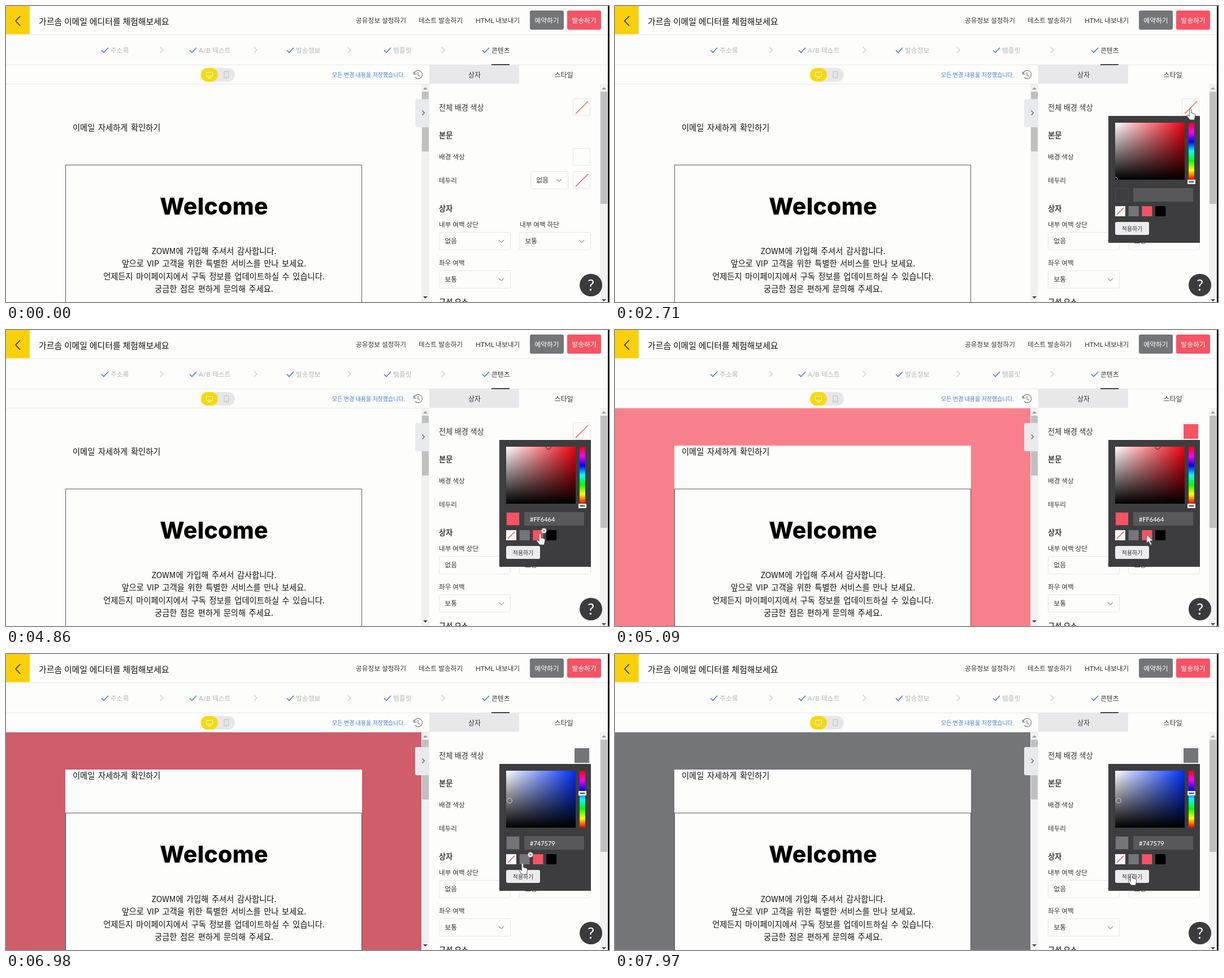
An HTML page that plays this animation: 1067 px wide and 525 px high, repeating every 8000 ms.

```html
<!DOCTYPE html>
<html lang="ko">
<head>
<meta charset="utf-8">
<style>
html, body { margin: 0; width: 100%; height: 100%; overflow: hidden; background: #fdfdfc; }
svg { position: fixed; left: 0; top: 0; display: block; }
text { font-family: Lato, "Noto Sans CJK KR", "Noto Sans CJK", sans-serif; white-space: pre; }
text.mail { font-family: "Noto Sans CJK KR", "Noto Sans CJK", sans-serif; word-spacing: 1.6px; }
text.logo { font-family: Inter, sans-serif; font-weight: 800; letter-spacing: .2px; }
text.head { stroke: #222; stroke-width: .3px; }
</style>
</head>
<body>
<svg id="stage" width="1067" height="525" viewBox="0 0 1067 525"></svg>
<script>
const RED = [246, 83, 100], GREY = [116, 117, 121], WHITE = [253, 253, 252];
const rgb = c => `rgb(${c.map(Math.round)})`;
const red = rgb(RED), grey = rgb(GREY), paper = rgb(WHITE);

const rect = (x, y, w, h, fill, more = '') =>
  `<rect x="${x}" y="${y}" width="${w}" height="${h}" fill="${fill}" ${more}/>`;
const line = (d, color, width = 1, more = '') =>
  `<path d="${d}" fill="none" stroke="${color}" stroke-width="${width}" ${more}/>`;
// y is the vertical middle of the glyphs
const text = (x, y, size, str, color = '#333', more = '') =>
  `<text x="${x}" y="${y + size * .37}" font-size="${size}" fill="${color}" ${more}>${str}</text>`;
const mid = 'text-anchor="middle"';
const head = (y, str) => text(766, y, 13.2, str, '#222', 'class="head"');
const frame = (x, y, w, h) => rect(x + .5, y + .5, w, h, paper, 'rx="2" stroke="#e6e6ec"');
const slash = (x, y, w, color) => line(`M${x} ${y + w}l${w} ${-w}`, color, 1.4);
const select = (x, y, w, str) => frame(x, y, w, 31) + text(x + 10.5, y + 16, 11.7, str) +
  line(`M${x + w - 20} ${y + 14}l4.5 4.5 4.5-4.5`, '#555');
const check = x => line(`M${x} 78.5l4 4 8-8.5`, '#4a7de8', 1.7);
const arrow = (x, y, dir, color) => `<path d="M${x - 4} ${y + 2 * dir}h8l-4 ${-4 * dir}z" fill="${color}"/>`;
const stops = list => list.map((c, i) =>
  `<stop offset="${i / (list.length - 1)}" stop-color="${c}"/>`).join('');

const editor = rect(0, 138, 735, 387, paper, 'id="backdrop"') +
  rect(105, 205, 525, 320, paper) +
  rect(105.5, 282, 524, 260, 'none', 'stroke="#55555c"') +
  text(118, 216, 14.25, '이메일 자세하게 확인하기', '#111', 'class="mail"') +
  text(368, 355, 41, 'Welcome', '#000', `class="logo" ${mid}`) +
  ['ZOWM에 가입해 주셔서 감사합니다.',
   '앞으로 VIP 고객을 위한 특별한 서비스를 만나 보세요.',
   '언제든지 마이페이지에서 구독 정보를 업데이트하실 수 있습니다.',
   '궁금한 점은 편하게 문의해 주세요.']
    .map((s, i) => text(368, 434.5 + i * 22.5, 14.25, s, '#111', `class="mail" ${mid}`)).join('') +
  rect(735, 138, 14, 387, '#f1f1f1') + rect(736, 152, 12, 106, '#c0c0c0') +
  arrow(742, 146, 1, '#999') + arrow(742, 517, -1, '#444') +
  '<path d="M749 165h-22q-3 0-3 3v44q0 3 3 3h22z" fill="#e9eaee"/>' +
  line('M736.5 185.500l4 4-4 4', '#555', 1.2);

const header = rect(0, 0, 1067, 138, paper) +
  rect(0, 0, 42, 50, '#fad00a') + line('M25 18l-8 8.500 8 8.500', '#222', 1.5) +
  text(58, 27, 14.9, '가르솜 이메일 에디터를 체험해보세요', '#111') +
  text(619, 26, 11.7, '공유정보 설정하기') + text(730, 26, 11.7, '테스트 발송하기') +
  text(831, 26, 11.7, 'HTML 내보내기') +
  rect(927, 8, 60, 34, grey, 'rx="3"') + text(957, 26, 11.8, '예약하기', '#fff', mid) +
  rect(993, 8, 60, 34, red, 'rx="3"') + text(1023, 26, 11.8, '발송하기', '#fff', mid) +
  [[169, '주소록'], [325, 'A/B 테스트'], [497, '발송정보'], [669, '템플릿'], [843, '콘텐츠']]
    .map(([x, s], i) => check(x) + text(x + 16, 79, 11.8, s, i == 4 ? '#333' : '#b4b4b0')).join('') +
  [273, 439, 605, 771].map(x => line(`M${x} 73l5 5-5 5`, '#aaa')).join('') +
  line('M0 51h1066M0 104.500h1066M0 138.500h749M749.500 105v33', '#e7e7e2') +
  rect(859, 103, 32, 2, '#444') +
  rect(345, 110, 60, 24, '#e7e7ea', 'rx="12"') + rect(345, 110, 30, 24, '#fad80a', 'rx="12"') +
  line('M354.500 117.500h11v7.500h-11zM357 127.500h6', '#fff', 1.2) +
  line('M386 116.500h8v11h-8zM389 125.500h2', '#bbb') +
  text(577, 122, 9.95, '모든 변경 내용을 저장했습니다.', '#3a7fd0') +
  line('M722 121a7.300 7.300 0 1 1 1.800 5.500M721 116.500l1 4.500 4.500-.5M729 117.500v5l3.500 2', '#777', 1.2) +
  rect(750, 105, 158, 33, '#e8e8ec') +
  text(829, 122.5, 12, '상자', '#333', mid) + text(987, 122.5, 12, '스타일', '#333', mid);

const sidebar = rect(749, 138, 318, 387, paper) +
  text(766, 180, 13.2, '전체 배경 색상') + frame(1003, 164, 30, 30) +
  `<g id="none">${slash(1008, 169, 22, '#ee6040')}</g>` + rect(1006, 167, 26, 26, red, 'id="chosen"') +
  head(229, '본문') +
  text(766, 268, 11.6, '배경 색상') + frame(1003, 252, 30, 30) +
  text(766, 310, 11.6, '테두리') + select(928, 293, 66, '없음') +
  frame(1003, 293, 30, 30) + slash(1008, 298, 22, '#e8506a') +
  head(359, '상자') +
  text(766, 388, 11.6, '내부 여백 상단') + text(909, 388, 11.6, '내부 여백 하단') +
  select(766, 401, 126, '없음') + select(908, 401, 126, '보통') +
  text(766, 456, 11.6, '좌우 여백') + select(766, 469, 126, '보통') +
  head(525, '구성 요소') +
  rect(1051, 138, 14, 387, '#f1f1f1') + rect(1052, 152, 12, 199, '#c0c0c0') +
  arrow(1058, 146, 1, '#999') + arrow(1058, 522, -1, '#444') +
  '<circle cx="1035" cy="495" r="20" fill="#3b3b3d"/>' +
  text(1035, 495.5, 27, '?', '#fff', mid);

const picker = '<g id="picker">' + rect(873, 195, 162, 225, '#3d3d3f') +
  rect(885, 207, 123, 101, '#f00010', 'id="hue"') +
  rect(885, 207, 123, 101, 'url(#tint)') + rect(885, 207, 123, 101, 'url(#shade)') +
  '<g clip-path="url(#field)"><circle id="spot" r="4.500" fill="none"/></g>' +
  rect(1015, 207, 10, 101, 'url(#rainbow)') +
  `<g id="handle">${rect(1013, -4, 14, 8, '#f6f6f6', 'rx="1"') + rect(1015.5, -1, 9, 2, '#444')}</g>` +
  rect(885.5, 323.5, 23, 23, 'none', 'id="preview" stroke="#4c4c4e"') +
  rect(917, 323, 106, 24, '#58585b', 'rx="1"') +
  text(927, 335.5, 11, '', '#fff', 'id="hex" font-weight="500"') +
  ['#fdfdfd', grey, red, '#000'].map((c, i) => rect(885 + 23.7 * i, 355, 18, 18, c)).join('') +
  slash(888, 358, 12, '#e85050') +
  '<g id="badge"><circle r="4.500" fill="#e4e4e4"/>' +
  line('M-1.500-1.500l3 3m0-3l-3 3', '#666') + '</g>' +
  rect(885, 383, 60, 23, '#ececef', 'rx="3"') + text(915, 395, 9.9, '적용하기', '#333', mid) + '</g>';

const cursor = '<g id="cursor" stroke="#555" fill="#fff" stroke-linejoin="round">' +
  '<path id="pointer" d="M0 0v15.500l3.500-3 3 6.500 2.500-1.200-3-6.300h5z"/>' +
  '<path id="hand" d="M-1.700 1.700a1.700 1.700 0 0 1 3.400 0v6l5 1.200q2.600.8 2 3.600l-1.500 7.500h-7.700l-5-6.200q-1.200-2 .8-2.500l3 2z"/></g>';

const $ = id => document.getElementById(id);
const set = (id, attrs) => { for (const k in attrs) $(id).setAttribute(k, attrs[k]); };
const show = (id, on) => set(id, { visibility: on ? 'inherit' : 'hidden' });

$('stage').innerHTML = '<defs>' +
  `<linearGradient id="tint"><stop stop-color="#fff"/><stop offset="1" stop-color="#fff" stop-opacity="0"/></linearGradient>
  <linearGradient id="shade" x2="0" y2="1"><stop stop-opacity="0"/><stop offset="1"/></linearGradient>
  <linearGradient id="rainbow" x2="0" y2="1">${stops(['red', 'magenta', 'blue', 'cyan', 'lime', 'yellow', 'red'])}</linearGradient>
  <clipPath id="field">${rect(885, 207, 123, 101, '#000')}</clipPath></defs>` +
  editor + sidebar + header + rect(1065, 0, 2, 525, '#000') + picker + cursor;

// cursor stops: time, x, y
const path = [[250, 905, 526], [800, 926, 430], [1000, 926, 430], [1750, 1018, 182], [2900, 1018, 182],
  [3950, 945, 361], [4950, 945, 361], [5600, 911, 373], [5900, 911, 373], [6500, 914, 371],
  [7250, 914, 371], [7750, 914, 390], [8000, 914, 390]];
const OPEN = 2350, PICK_RED = 4780, PICK_GREY = 6800, DELAY = 90, FADE = 300;

const mix = (a, b, k) => a.map((v, i) => v + (b[i] - v) * k);
const ramp = (t, from, span) => Math.min(1, Math.max(0, (t - from) / span));
const within = (t, a, b) => t >= a && t < b;

function place(t) {
  const i = Math.max(1, path.findIndex(p => p[0] >= t));
  const a = path[i - 1], b = path[i], k = ramp(t, a[0], b[0] - a[0]);
  return mix(a, b, k * k * (3 - 2 * k)).slice(1);
}

function draw(t) {
  const isRed = t >= PICK_RED, isGrey = t >= PICK_GREY;
  const [x, y] = place(t);
  show('cursor', t > 250);
  set('cursor', { transform: `translate(${x} ${y})` });
  const hand = within(t, 1600, 3050) || within(t, 3800, 5080) || t >= 5480;
  show('hand', hand);
  show('pointer', !hand);

  const toRed = mix(WHITE, RED, ramp(t, PICK_RED + DELAY, FADE));
  set('backdrop', { fill: rgb(mix(toRed, GREY, ramp(t, PICK_GREY + DELAY, FADE))) });
  const applied = t >= PICK_RED + DELAY;
  show('none', !applied);
  show('chosen', applied);
  set('chosen', { fill: t >= PICK_GREY + DELAY ? grey : red });

  show('picker', t >= OPEN);
  set('hue', { fill: isGrey ? '#0030f8' : '#f00010' });
  const [cx, cy, stroke] = isGrey ? [891, 260, '#ddd'] : isRed ? [960, 207, '#222'] : [885, 308, '#ddd'];
  set('spot', { cx, cy, stroke });
  set('handle', { transform: `translate(0 ${isGrey ? 247 : 312})` });
  set('preview', { fill: isGrey ? grey : isRed ? red : 'none' });
  $('hex').textContent = isGrey ? '#747579' : isRed ? '#FF6464' : '';
  const onRed = within(t, 3800, 5080);
  show('badge', t >= OPEN && (onRed || within(t, 5480, 7500)));
  set('badge', { transform: `translate(${onRed ? 952 : 928} 356)` });
}

const start = performance.now();
function tick() {
  draw((performance.now() - start) % 8000);
  requestAnimationFrame(tick);
}
tick();
</script>
</body>
</html>
```
